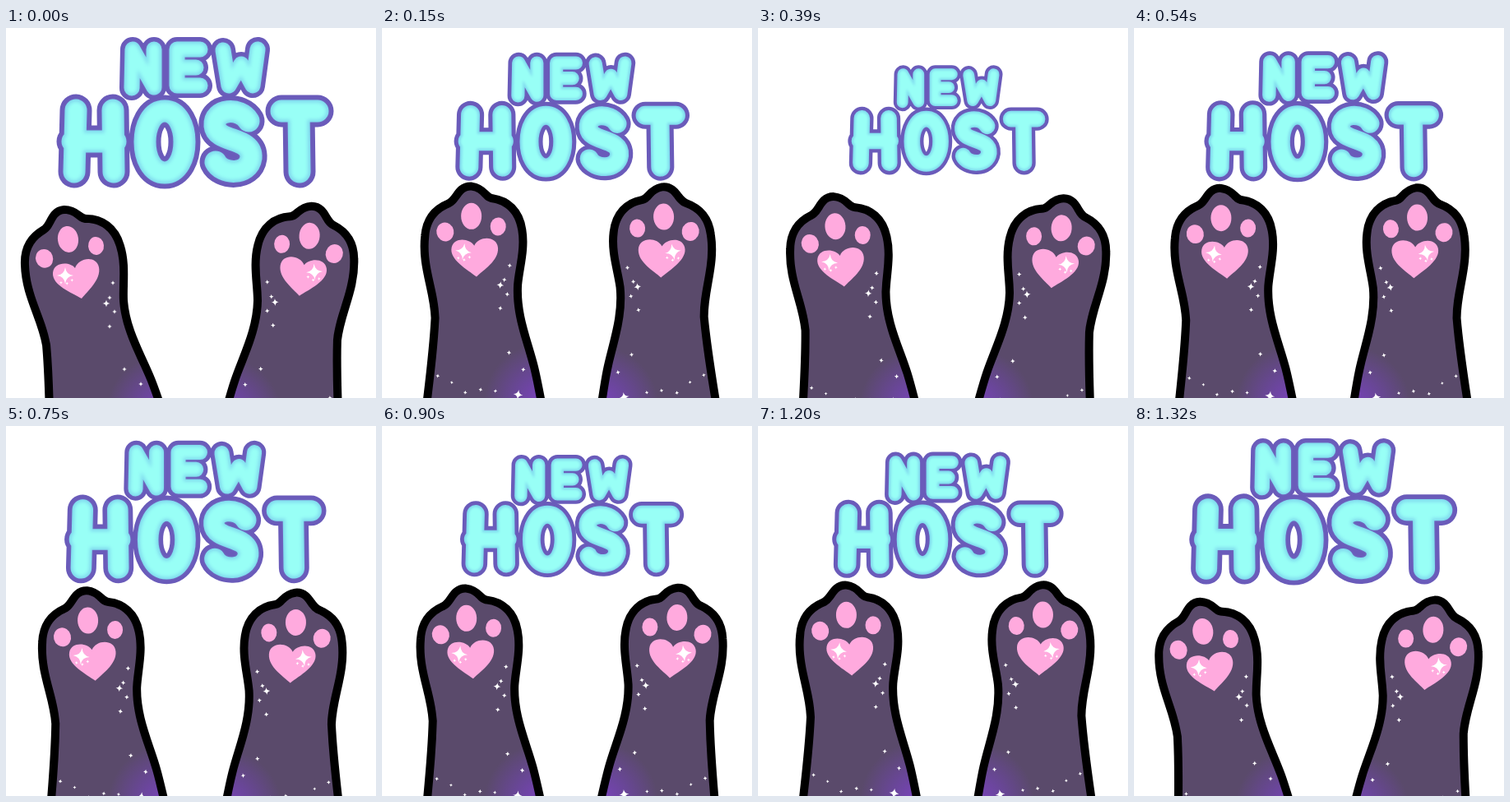
These frames come from a looping animation (450 px wide and 450 px high, 1.35 s). An HTML page:

```html
<!DOCTYPE html>
<html lang="en">
<head>
<meta charset="utf-8">
<title>New host</title>
<style>
  html, body { margin: 0; width: 100%; height: 100%; overflow: hidden; background: #fff; }
  svg { display: block; width: 100vw; height: 100vh; }
  .word { fill: none; stroke-linecap: round; stroke-linejoin: round; }
</style>
</head>
<body>
<svg viewBox="0 0 450 450" role="img" aria-label="NEW HOST">
  <defs>
    <radialGradient id="glow" gradientUnits="userSpaceOnUse" cx="192" cy="468" r="70">
      <stop offset="0" stop-color="#7a42bd"/>
      <stop offset=".45" stop-color="#6a469a"/>
      <stop offset="1" stop-color="#5a4a6b"/>
    </radialGradient>
    <filter id="soft" x="-10%" y="-10%" width="120%" height="120%"><feGaussianBlur stdDeviation="2"/></filter>
    <path id="new" d="M153 73 L154 26 L180 72 V26 M236 26 H208 V70 H236 M208 48 H231
      M264 27 L271 70 L286 44 L300 70 L306 26"/>
    <path id="host" d="M85 100 L83 175 M130 100 L131 175 M81 138 H133
      M193 101 C225 101 225 176 193 176 S161 101 193 101 Z
      M295 113 C285 96 252 98 254 119 C256 140 300 132 298 158 C295 180 262 178 255 163
      M335 101 H379 M356 104 L357 175"/>
    <g id="paw">
      <path fill="url(#glow)" stroke="#000" stroke-width="20" stroke-linejoin="round" paint-order="stroke"
        d="M59 520 C58 480 58 430 54 385 C48 350 29 325 28 288 C27 268 36 257 48 250
        C60 243 58 227 71 226 C85 226 86 237 98 237 C114 237 128 246 134 266
        C141 288 137 310 138 332 C141 370 160 400 172 430 C182 455 192 490 205 520 Z"/>
      <g fill="#ffaade">
        <ellipse cx="46.500" cy="280.500" rx="10.500" ry="11.500" transform="rotate(-20 46 280)"/>
        <ellipse cx="75.500" cy="257" rx="12.500" ry="16" transform="rotate(-8 75 257)"/>
        <ellipse cx="109.500" cy="265" rx="9.500" ry="11" transform="rotate(-5 109 265)"/>
        <path d="M92 329 C80 322 56 313 57 298 C58 284 78 284 84 292 C88 279 110 276 113 291 C116 306 99 320 92 329 Z"/>
      </g>
      <path id="stars" fill="#fff"/>
    </g>
  </defs>
  <g id="title"></g>
  <g id="left"><use href="#paw"/></g>
  <g id="right">
    <use href="#paw" transform="translate(368 268.500) rotate(-3.300) scale(-1 1) translate(-77.500 -272.500)"/>
  </g>
</svg>
<script>
const LOOP = 1350, STEP = 30;
const el = id => document.getElementById(id);

// Four-pointed star with thin, curved arms
function star(x, y, r) {
  const c = r * 0.11;
  return `M${x} ${y - r}Q${x + c} ${y - c} ${x + r} ${y}Q${x + c} ${y + c} ${x} ${y + r}` +
    `Q${x - c} ${y + c} ${x - r} ${y}Q${x - c} ${y - c} ${x} ${y - r}Z`;
}

function starField() {
  let seed = 11;
  const random = () => (seed = seed * 16807 % 2147483647) / 2147483647;
  let d = star(72, 301, 10) + star(122, 335, 4.5) + star(162, 464, 6);
  // Dust below the big sparkle
  for (let i = 0; i < 3; i++) {
    const angle = 0.6 + i * 0.75;
    d += star(72 + 10 * Math.cos(angle), 301 + 10 * Math.sin(angle), 2);
  }
  // Trail down the wrist
  for (const [x, y] of [[130, 310], [126, 328], [132, 345], [126, 363], [144, 415], [164, 433]]) d += star(x, y, 2.8);
  // Scatter near the sleeve
  for (let i = 0; i < 5; i++) d += star(62 + 18 * i, 455 + 18 * random(), 2 + random());
  return d;
}
el('stars').setAttribute('d', starField());

// Bubble letters: outline, shaded edge, bright core
const layers = [['#6a5bba', 12, ''], ['#80d9ee', 0, ''], ['#98fff6', -6, 'filter="url(#soft)"']];
el('title').innerHTML = layers.map(([color, grow, extra]) =>
  `<g class="word" stroke="${color}" ${extra}>
    <use href="#new" stroke-width="${19 + grow * 0.92}"/>
    <use href="#host" stroke-width="${27 + grow}"/>
  </g>`).join('');

// Position among turning points: 0 at the first, 1 at the second and so on
function phase(turns, t) {
  const i = Math.max(1, turns.findIndex(turn => turn >= t));
  return i - 1 + (t - turns[i - 1]) / (turns[i] - turns[i - 1]);
}

const pulseTurns = [0, 330, 690, 1050, LOOP];
const swingTurns = [0, 390, 840, LOOP];
const arch = u => Math.abs(Math.sin(Math.PI * u));

function draw(now) {
  const t = Math.floor(now % LOOP / STEP) * STEP;
  const beat = t * 4 / LOOP % 1;
  const size = 0.67 + 0.33 * Math.abs(1 - phase(pulseTurns, t) % 2);
  const wave = arch(beat ** 0.9);
  const lift = arch(beat) ** 1.2;
  const swing = arch(phase(swingTurns, t));
  const set = (id, value) => el(id).setAttribute('transform', value);
  set('title', `translate(235.5 136) scale(${size}) translate(-235.5 -136)`);
  set('left', `translate(${32.5 * wave} ${-28 * wave}) rotate(${8 * wave} 77 262)`);
  set('right', `translate(${-27 * swing} ${-23.5 * lift}) rotate(${-7.5 * swing} 367 263)`);
}

const start = performance.now();
(function tick() {
  draw(performance.now() - start);
  requestAnimationFrame(tick);
})();
</script>
</body>
</html>
```
